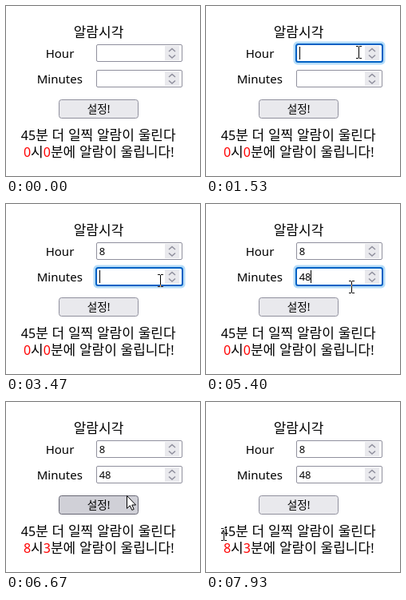
Recreate the animation shown at these times as an HTML page. Size 243 by 213 pixels, loop 8 s.

```html
<!DOCTYPE html>
<html lang="ko">
<head>
<meta charset="utf-8">
<title>알람시각</title>
<style>
  html, body { margin: 0; width: 100%; height: 100%; overflow: hidden; background: #fff; }
  svg { display: block; }
  text { white-space: pre; fill: #000; font: 15px "Noto Sans", "Open Sans", sans-serif; }
  .mid { text-anchor: middle; }
  .ko { font: 17px "Noto Sans CJK KR", "Noto Sans CJK JP", sans-serif; }
  .ko tspan { font: 16px "Noto Sans", "Open Sans", sans-serif; }
  .ko .red { fill: #f00; }
  .btn { font-size: 13.6px; font-weight: 500; }
  .btn tspan { font-size: 13.6px; font-weight: 500; }
  .val { font-size: 13px; font-weight: 500; }
  .box { fill: #fff; stroke: #8f8f9d; }
  .chev { fill: none; stroke: #8f8f9d; stroke-width: 1.5; }
  #beam { mix-blend-mode: difference; }
</style>
</head>
<body>
<svg width="243" height="213" viewBox="0 0 243 213">
  <defs>
    <g id="field">
      <rect class="box" x="113.5" y=".5" width="107" height="21" rx="1.5"/>
    </g>
    <g id="ring">
      <rect x="109.5" y="-3.5" width="115" height="29" rx="5" fill="#b5dcf8"/>
      <rect x="113" y="0" width="108" height="22" rx="2.5" fill="#fff" stroke="#0061c4" stroke-width="2"/>
    </g>
    <g id="spin">
      <rect x="199" y="2" width="18" height="18" fill="#e9e9ed"/>
      <path class="chev" d="M204 9l4-3.5 4 3.5M204 13.5l4 3.5 4-3.5"/>
    </g>
  </defs>
  <rect width="243" height="213" fill="#fff"/>

  <text class="mid ko" x="116" y="39">알람시각</text>
  <text class="mid" x="67.5" y="65">Hour</text>
  <text class="mid" x="67.3" y="97">Minutes</text>

  <use href="#field" y="48"/>
  <use href="#ring" y="48" id="hourRing"/>
  <use href="#spin" y="48"/>
  <use href="#field" y="80"/>
  <use href="#ring" y="80" id="minRing"/>
  <use href="#spin" y="80"/>

  <text class="val" id="hour" x="116.7" y="64">8</text>
  <text class="val" id="min1" x="116.7" y="96">4</text>
  <text class="val" id="min2" x="116.7" y="96">48</text>
  <rect id="caret" width="1" height="16"/>

  <rect id="button" x="66.5" y="117.5" width="99" height="23" rx="3" fill="#e9e9ed" stroke="#8f8f9d"/>
  <text class="mid ko btn" x="116" y="134">설정<tspan>!</tspan></text>

  <text class="mid ko" x="115.7" y="168"><tspan>45</tspan>분 더 일찍 알람이 울린다</text>
  <text class="mid ko" id="before" x="116.2" y="189"><tspan class="red">0</tspan>시<tspan class="red">0</tspan>분에 알람이 울립니다<tspan>!</tspan></text>
  <text class="mid ko" id="after" x="116.2" y="189"><tspan class="red">8</tspan>시<tspan class="red">3</tspan>분에 알람이 울립니다<tspan>!</tspan></text>

  <path id="arrow" d="M.5 .5V16.4L4.3 12.8 6.8 18.4 9.2 17.4 6.8 12H11.6Z" fill="#fff" stroke="#000"/>
  <path id="beam" d="M-3-7.5H0M1-7.5H4M.5-7V7M-3 7.5H0M1 7.5H4" fill="none" stroke="#fff"/>
</svg>
<script>
const LOOP = 8000;
const $ = id => document.getElementById(id);

// Each step holds until the next one.
function play(id, steps) {
  const frames = steps.map(([t, style]) => ({ offset: t / LOOP, easing: "step-end", ...style }));
  frames.push({ ...frames[frames.length - 1], offset: 1 });
  $(id).animate(frames, { duration: LOOP, iterations: Infinity });
}

const shown = on => ({ opacity: on ? 1 : 0 });
const at = (x, y, on = true) => ({ ...shown(on), transform: `translate(${x}px, ${y}px)` });

// Visible from start until end.
function show(id, start, end = LOOP) {
  const steps = [[0, shown(start === 0)]];
  if (start > 0) steps.push([start, shown(true)]);
  if (end < LOOP) steps.push([end, shown(false)]);
  play(id, steps);
}

show("hourRing", 1530, 3130);
show("minRing", 3470, 5800);
show("hour", 2530);
show("min1", 4000, 5200);
show("min2", 5200);
show("before", 0, 6670);
show("after", 6670);

const idle = { fill: "#e9e9ed", stroke: "#8f8f9d" };
const hover = { fill: "#d0d0d7", stroke: "#676774" };
play("button", [[0, idle], [6400, hover], [6930, idle]]);

play("caret", [
  [0, at(117, 51, false)],
  [1530, at(117, 51)],
  [2070, at(117, 51, false)],
  [2530, at(124, 51)],
  [3130, at(117, 83, false)],
  [3470, at(117, 83)],
  [4000, at(124, 83)],
  [4530, at(124, 83, false)],
  [5070, at(124, 83)],
  [5200, at(131, 83)],
  [5730, at(131, 83, false)]
]);

// Pointer path: time, shape (a = arrow, i = text beam), x, y
const path = [
  [0, "", 0, 0],
  [1200, "a", 234, 36], [1270, "a", 226, 43], [1330, "a", 216, 50], [1400, "a", 204, 56],
  [1470, "i", 194, 58], [1530, "i", 191, 58], [1600, "i", 190, 58],
  [2800, "i", 190, 65], [2870, "a", 191, 77],
  [3330, "i", 192, 91], [3400, "i", 193, 96],
  [5400, "i", 182, 104], [5470, "a", 174, 106], [5530, "a", 166, 109],
  [5600, "a", 159, 112], [5670, "a", 155, 114],
  [6400, "a", 154, 116], [6470, "a", 152, 117], [6530, "a", 151, 117],
  [6800, "a", 148, 121], [6870, "a", 128, 136], [6930, "a", 101, 149],
  [7000, "i", 76, 164], [7070, "i", 57, 171], [7130, "i", 48, 173],
  [7270, "i", 46, 172], [7330, "i", 42, 170], [7400, "i", 38, 168],
  [7470, "i", 34, 167], [7530, "i", 31, 166],
  [7670, "i", 28, 166], [7730, "i", 26, 166],
  [7870, "i", 24, 166], [7930, "i", 22, 166]
];
for (const [id, kind] of [["arrow", "a"], ["beam", "i"]])
  play(id, path.map(([t, shape, x, y]) => [t, at(x, y, shape === kind)]));
</script>
</body>
</html>
```
